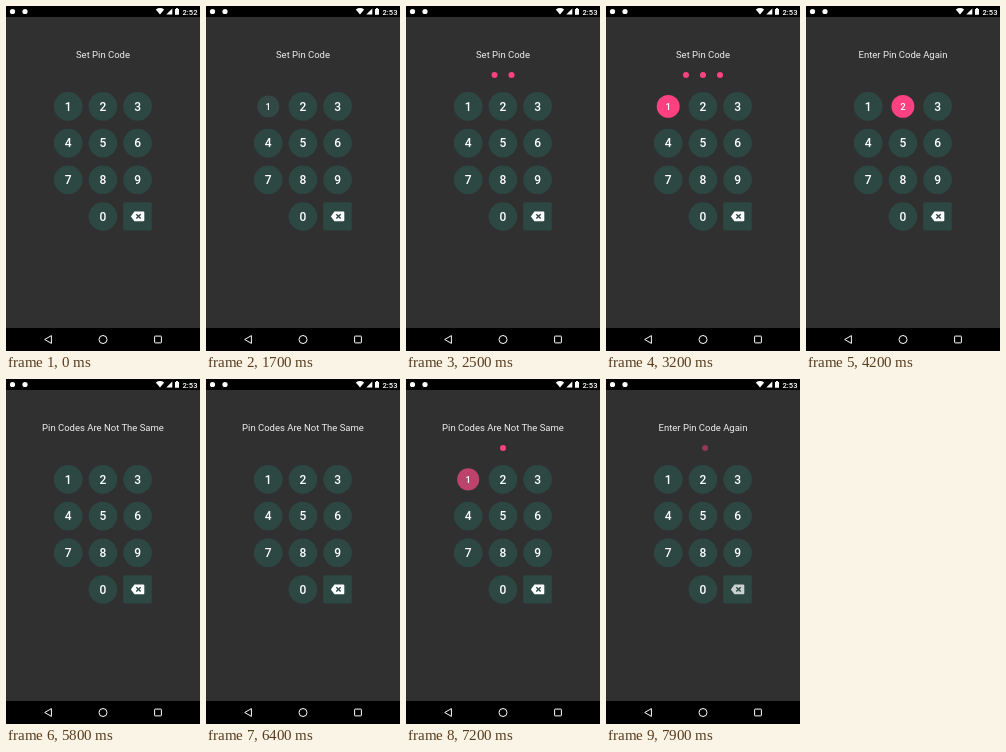
These frames come from a looping animation (194 px wide and 345 px high, 8000 ms). An HTML page:

```html
<!DOCTYPE html>
<html lang="en">
<head>
<meta charset="utf-8">
<title>Pin code</title>
<style>
html, body { margin: 0; width: 100%; height: 100%; overflow: hidden; background: #303030; }
svg { display: block; width: 100%; height: 100%; }
text { font-family: Roboto, sans-serif; fill: #fff; text-anchor: middle; }
</style>
</head>
<body>
<svg id="stage" viewBox="0 0 194 345">
  <rect width="194" height="345" fill="#303030"/>
  <rect width="194" height="11" fill="#000"/>
  <rect y="322" width="194" height="23" fill="#000"/>
  <g fill="#fff">
    <circle cx="6.5" cy="5.5" r="2.6"/>
    <circle cx="19" cy="5.5" r="2.6"/>
    <path d="M149.8 3.5Q154 .6 158.2 3.5L154 8.6Z"/>
    <path d="M160.3 8.6H166.3V2.4Z"/>
    <path d="M169 2.9H170.1V2.1H171.9V2.9H173V8.8H169Z"/>
  </g>
  <text id="clock" x="184" y="8.6" font-size="7.6" font-weight="500"></text>
  <g fill="none" stroke="#fff" stroke-width="1" stroke-linejoin="round">
    <path d="M45.4 329.6V337.4L38.7 333.5Z"/>
    <circle cx="97" cy="333.5" r="4"/>
    <rect x="148.6" y="330.1" width="6.8" height="6.8" rx=".6"/>
  </g>
  <text id="title" x="97" y="51.6" font-size="9.5" fill-opacity=".92"></text>
  <g id="dots"></g>
  <g id="keys"></g>
  <rect x="117.2" y="196.2" width="28.6" height="28.4" rx="2" fill="#2d4843"/>
  <g id="erase">
    <path d="M124.9 210.4L128.4 205.6H137.3Q138.3 205.6 138.3 206.6V214.2Q138.3 215.2 137.3 215.2H128.4Z" fill="#fff"/>
    <path d="M130.3 208.2L134.7 212.6M134.7 208.2L130.3 212.6" stroke="#2d4843" stroke-width="1.4"/>
  </g>
</svg>
<script>
const LOOP = 8000, GREEN = [45, 72, 67], PINK = [255, 64, 129];
const $ = id => document.getElementById(id);
const clamp = x => Math.max(0, Math.min(1, x));
const ramp = (t, a, b) => clamp((t - a) / (b - a));
const ease = x => x * x * (3 - 2 * x);

const presses = {
  1: [1600, 2090, 2560, 3020, 6700, 7060],
  2: [4020, 4450, 4830, 5220]
};
const erases = [7480, 7780];
const titles = [
  [0, 'Set Pin Code'],
  [3300, 'Enter Pin Code Again'],
  [5500, 'Pin Codes Are Not The Same'],
  [7700, 'Enter Pin Code Again']
];
// Each change: time, number of dots from then on
const counts = [
  [0, 0], [1850, 1], [2340, 2], [2810, 3], [3270, 0],
  [4270, 1], [4700, 2], [5080, 3], [5470, 0],
  [6950, 1], [7310, 2], [7560, 1], [7840, 0]
];

function add(parent, tag, attrs, label) {
  const el = document.createElementNS('http://www.w3.org/2000/svg', tag);
  for (const k in attrs) el.setAttribute(k, attrs[k]);
  if (label !== undefined) el.textContent = label;
  return parent.appendChild(el);
}

const keys = [1, 2, 3, 4, 5, 6, 7, 8, 9, 0].map((digit, i) => {
  const col = digit ? i % 3 : 1, row = digit ? Math.floor(i / 3) : 3;
  const x = 62.2 + col * 34.7, y = 100.4 + row * 36.7;
  const g = add($('keys'), 'g', {});
  const disc = add(g, 'circle', { r: 14.3 });
  add(g, 'text', { y: 4.3, 'font-size': 12, 'font-weight': 500 }, digit);
  return { digit, x, y, g, disc };
});
const dots = [0, 1, 2].map(() => add($('dots'), 'circle', { cy: 69, r: 3, fill: '#ff4081' }));

function last(list, t) {
  let i = 0;
  while (i + 1 < list.length && list[i + 1][0] <= t) i++;
  return i;
}

function drawKey(key, t) {
  let squeeze = 0, tint = 0;
  for (const start of presses[key.digit] || []) {
    const age = t - start;
    squeeze = Math.max(squeeze, ease(ramp(age, 0, 90)) * (1 - ease(ramp(age, 130, 350))));
    tint = Math.max(tint, ramp(age, 100, 160) * (1 - ramp(age, 220, 340)));
  }
  const color = GREEN.map((c, i) => Math.round(c + (PINK[i] - c) * tint));
  key.g.setAttribute('transform', `translate(${key.x} ${key.y}) scale(${1 - 0.23 * squeeze})`);
  key.disc.setAttribute('fill', `rgb(${color})`);
}

function drawDots(t) {
  const i = last(counts, t), now = counts[i][1], before = i ? counts[i - 1][1] : 0;
  const p = ease(ramp(t, counts[i][0], counts[i][0] + 120));
  const left = n => 97 - (Math.max(n, 1) - 1) * 8.5;
  const start = left(before) + (left(now) - left(before)) * p;
  dots.forEach((dot, n) => {
    const from = n < before ? 1 : 0, to = n < now ? 1 : 0;
    const slide = now ? 0 : 4 * p;
    dot.setAttribute('cx', start + n * 17 + slide);
    dot.setAttribute('opacity', from + (to - from) * p);
  });
}

function draw(t) {
  $('clock').textContent = t < 1300 ? '2:52' : '2:53';
  $('title').textContent = titles[last(titles, t)][1];
  keys.forEach(key => drawKey(key, t));
  drawDots(t);
  const dim = Math.max(...erases.map(s => ramp(t, s, s + 80) * (1 - ramp(t, s + 130, s + 220))));
  $('erase').setAttribute('opacity', 1 - 0.25 * dim);
}

const begin = performance.now();
function tick() {
  draw((performance.now() - begin) % LOOP);
  requestAnimationFrame(tick);
}
tick();
</script>
</body>
</html>
```
